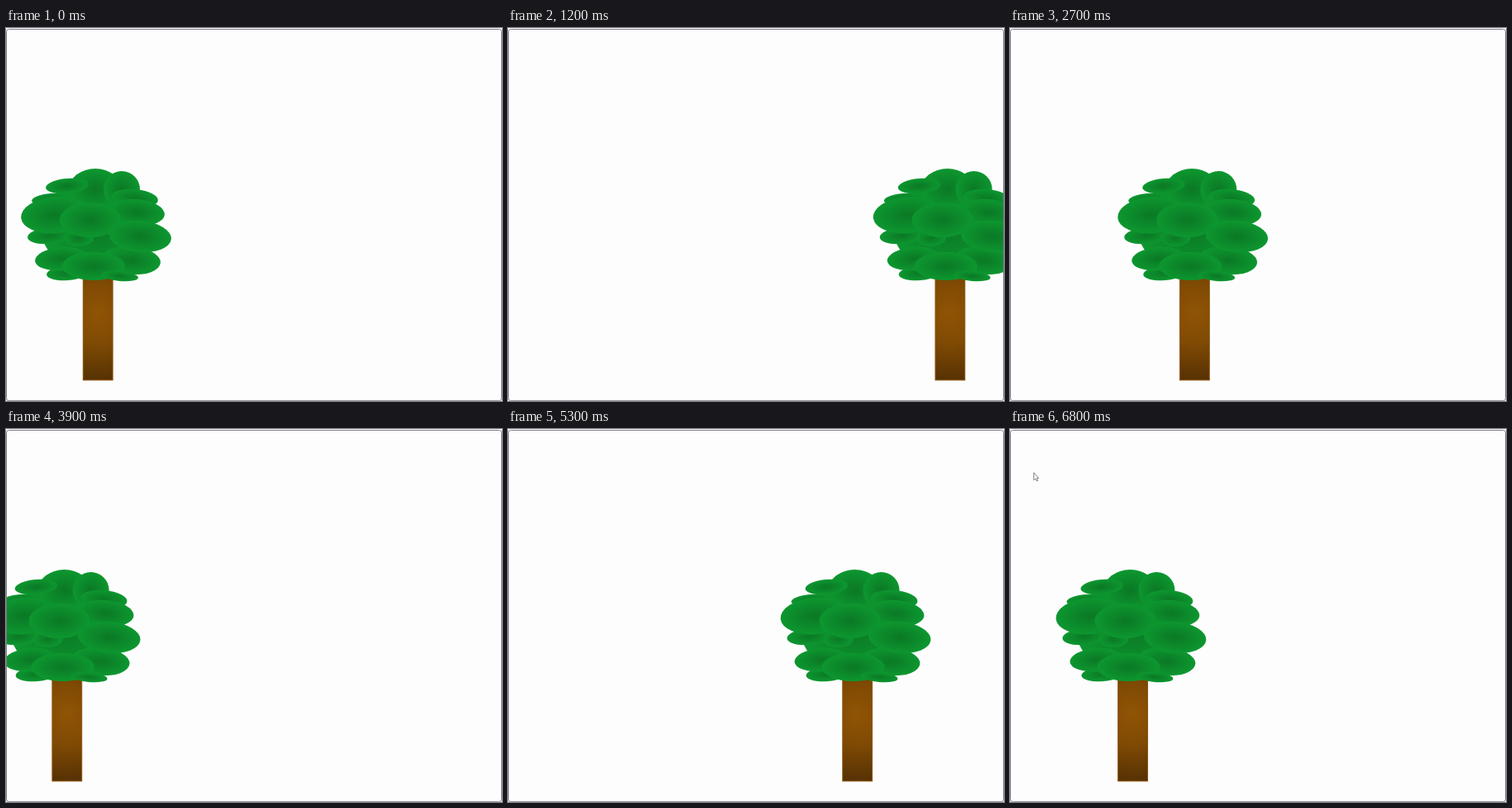
These frames come from a looping animation (600 by 451 pixels, 6.9 s). An HTML page:

```html
<!DOCTYPE html>
<html lang="en">
<head>
<meta charset="utf-8">
<title>Walking tree</title>
<style>
  html, body { margin: 0; width: 100%; height: 100%; overflow: hidden; background: #fefdfe; }
  svg { display: block; width: 600px; height: 451px; }
</style>
</head>
<body>
<svg viewBox="0 0 600 451" xmlns="http://www.w3.org/2000/svg">
  <defs>
    <radialGradient id="bark" gradientUnits="userSpaceOnUse" cx="111" cy="345" r="82">
      <stop offset="0" stop-color="#905404"/>
      <stop offset=".45" stop-color="#7f4a04"/>
      <stop offset="1" stop-color="#553103"/>
    </radialGradient>
    <radialGradient id="foliage" r=".52">
      <stop offset="0" stop-color="#0b7825"/>
      <stop offset="1" stop-color="#0d9830"/>
    </radialGradient>
  </defs>
  <rect width="600" height="451" fill="#fefdfe"/>
  <g id="tree">
    <rect x="93.3" y="290" width="35.8" height="135.8" fill="url(#bark)" stroke="#8d510c"/>
    <g id="crown"></g>
  </g>
  <path id="cursor" d="M28.8 52.8v9l2-1.8 1.6 3 1.4-.7-1.5-2.9h2.3z" fill="#fff" stroke="#70747c" stroke-width=".9"/>
  <rect x=".5" y="1.5" width="599" height="449.2" rx="3" fill="none" stroke="#7c7d8c"/>
</svg>
<script>
const LOOP = 6900, FRAME = 100;
const STEP = 12.46, WRAP = 57, LEFT_LIMIT = -16;
const LEFT = -1, RIGHT = 1, DROOP = 5;
const byId = id => document.getElementById(id);

function clump(cx, cy, rx, ry, tilt = 0) {
  const node = document.createElementNS('http://www.w3.org/2000/svg', 'ellipse');
  const attrs = { cx, cy, rx, ry, transform: `rotate(${tilt} ${cx} ${cy})`, fill: 'url(#foliage)' };
  for (const key in attrs) node.setAttribute(key, attrs[key]);
  byId('crown').append(node);
}

// A leaf reaches out to tipX and hangs slightly; thicker leaves are longer.
function leaf(side, tipX, cy, thickness) {
  const length = 15 + 1.2 * thickness;
  clump(tipX - side * length, cy, length, thickness, side * DROOP);
}

function buildCrown() {
  clump(110, 240, 68, 58);
  leaf(LEFT, 49, 296, 9);
  leaf(LEFT, 26, 251, 10);
  clump(108, 195, 32, 25);
  clump(140, 195, 22, 22);
  leaf(RIGHT, 184, 206, 11);
  leaf(LEFT, 48, 191, 9);
  leaf(LEFT, 31, 207, 7);
  leaf(LEFT, 18, 226, 22);
  leaf(RIGHT, 192, 223, 16);
  leaf(RIGHT, 187, 281, 17);
  leaf(LEFT, 35, 279, 14);
  clump(88, 254, 18, 10);
  clump(102, 232, 37, 21);
  leaf(RIGHT, 200, 252, 19);
  clump(106, 288, 38, 17);
  leaf(RIGHT, 160, 300, 6);
}

// [time, steps walked]: off to the right, a short rest, then back again.
const walk = [[0, 0], [700, 24], [2900, 70], [3150, 70], [6250, 5], [6800, 3]];

function stepsAt(t) {
  const next = Math.max(1, walk.findIndex(([time]) => time >= t));
  const [t0, k0] = walk[next - 1], [t1, k1] = walk[next];
  return Math.round(k0 + (k1 - k0) * (t - t0) / (t1 - t0));
}

// Leaving the stage on one side brings the tree back on the other.
const wrapped = steps => (steps - LEFT_LIMIT) % WRAP + LEFT_LIMIT;

function draw(ms) {
  const t = Math.floor(ms % LOOP / FRAME) * FRAME;
  byId('tree').setAttribute('transform', `translate(${wrapped(stepsAt(t)) * STEP} 0)`);
  byId('cursor').setAttribute('visibility', t >= 6800 ? 'visible' : 'hidden');
}

buildCrown();
const start = performance.now();
function tick() {
  draw(performance.now() - start);
  requestAnimationFrame(tick);
}
tick();
</script>
</body>
</html>
```
